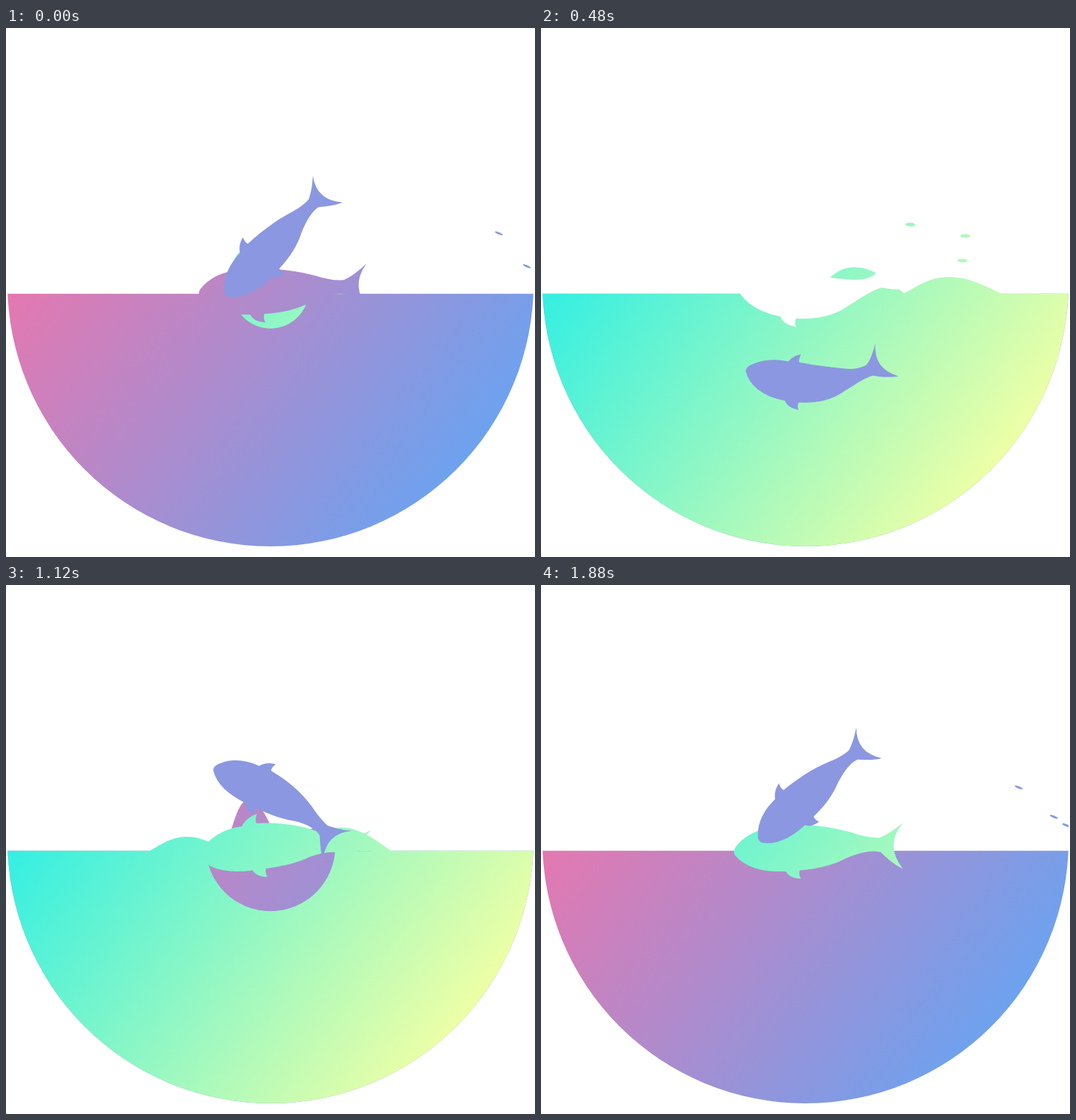
These frames come from a looping animation (748x748 px, 1.92 s). An HTML page with a canvas:

```html
<!DOCTYPE html>
<html lang="en">
<head>
<meta charset="utf-8">
<title>Whale loop</title>
<style>
html, body { margin: 0; width: 100%; height: 100%; overflow: hidden; background: #fff; }
canvas { display: block; }
</style>
</head>
<body>
<canvas id="stage" width="748" height="748"></canvas>
<script>
const ctx = document.getElementById('stage').getContext('2d');
const LOOP = 1920, STEP = 40, WATER = 375.7, DEG = Math.PI / 180;
const mix = (a, b, u) => a + (b - a) * u;

function gradient(from, to) {
  const g = ctx.createLinearGradient(184, 138, 712, 534);
  g.addColorStop(0, from);
  g.addColorStop(1, to);
  return g;
}
const PINK = gradient('#e478b0', '#6da2ef');
const TEAL = gradient('#34efe2', '#eeffa6');
const VIOLET = '#8b97e0';

// Whale outline as quadratic curves (control, end).
// Each point is a distance along the spine and an offset below it.
const PEDUNCLE = [206, -9.5], FIN = [71, 32.5], TAIL = 226, ANCHOR = 88;
const OUTLINE = [
  [[20, 31], [1, 3]], [[-2, -4], [6, -11]], [[28, -32], [66, -31.5]],  // head
  [[74, -43], [88, -45.5]], [[84, -38], [86, -32.5]],                  // back fin
  [[132, -29], [168, -17]], [[190, -9], PEDUNCLE],                     // back
  [[220, -15], [239, -31]], [[213, 1], [240, 34]], [[226, 28], [208, 11]], // tail
  [[192, 6], [158, 19]], [[132, 32], [91, 32.5]],                      // belly
  [[89, 40], [92, 44.5]], [[76, 43], FIN]                              // lower fin
];

function whale(x0, y0, tilt, bend, scale, color) {
  const angle = s => {
    const p = Math.min(s / TAIL, 1);
    return (tilt + bend * ((p + p * p) / 1.9 - 0.12)) * DEG;
  };
  const plot = (s, v) => {
    const n = 12, ds = (s - ANCHOR) / n, a = angle(s);
    let x = -v * Math.sin(a), y = v * Math.cos(a);
    for (let i = 0; i < n; i++) {
      const along = angle(ANCHOR + (i + 0.5) * ds);
      x += ds * Math.cos(along);
      y += ds * Math.sin(along);
    }
    ctx.lineTo(x0 + x * scale, y0 + y * scale);
  };
  ctx.beginPath();
  let from = FIN;
  for (const [control, to] of OUTLINE) {
    for (let u = 0.125; u <= 1; u += 0.125) {
      const at = i => mix(mix(from[i], control[i], u), mix(control[i], to[i], u), u);
      plot(at(0), at(1));
    }
    from = to;
  }
  ctx.fillStyle = color;
  ctx.fill();
}

// Jump key poses: time, height of the anchor, tilt.
const JUMP = [
  [0, 323, -47], [160, 466, -27], [480, 501, 14], [800, 474, 28],
  [1120, 289, 22], [1320, 257, -7], [1600, 262, -25], [1880, 309, -45]
];

// Smooth periodic interpolation of the jump.
function jump(t, c) {
  const n = JUMP.length;
  const key = k => JUMP[(k + n) % n][c];
  const time = k => JUMP[(k + n) % n][0] + Math.floor(k / n) * LOOP;
  const gap = k => time(k + 1) - time(k);
  const rise = k => (key(k + 1) - key(k)) / gap(k);
  const slope = k => (rise(k - 1) * gap(k) + rise(k) * gap(k - 1)) / (gap(k - 1) + gap(k));
  const i = JUMP.filter(k => k[0] <= t).length - 1;
  const u = (t - time(i)) / gap(i), v = 1 - u;
  return key(i) * v * v * (1 + 2 * u) + key(i + 1) * u * u * (1 + 2 * v)
    + gap(i) * u * v * (slope(i) * v - slope(i + 1) * u);
}

// Sea spreading from the centre.
function sea(age, color) {
  const r = Math.min(0.895 * age + 2.05e-6 * age ** 3, 372);
  ctx.save();
  ctx.beginPath();
  ctx.rect(0, WATER, 748, 372);
  ctx.clip();
  ctx.beginPath();
  ctx.arc(374, 372.5 - 0.031 * r, r, 0, 2 * Math.PI);
  ctx.fillStyle = color;
  ctx.fill();
  ctx.restore();
}

// Waves drift between two places (left foot, crest, right foot) and swell once.
const SPLASH = [
  { birth: 100, life: 380, height: 38, pace: 1, from: [134, 134, 134], to: [309, 422, 514] },
  { birth: 0, life: 760, height: 79, pace: 1.3, from: [300, 330, 375], to: [385, 443, 515] },
  { birth: 40, life: 760, height: 42, pace: 0.5, from: [294, 344, 415], to: [512, 577, 652] }
];
const BREACH = [
  { birth: 0, life: 400, height: 27, pace: 1, from: [130, 200, 270], to: [309, 340, 368] },
  { birth: 0, life: 400, height: 45, pace: 1, from: [395, 430, 470], to: [456, 536, 654] }
];

function waves(list, age, color) {
  ctx.fillStyle = color;
  for (const { birth, life, height, pace, from, to } of list) {
    const u = (age - birth) / life;
    if (u <= 0 || u >= 1) continue;
    const [l, p, r] = from.map((x, i) => mix(x, to[i], (age / 540) ** pace));
    const h = height * Math.sin(Math.PI * Math.sqrt(u));
    const top = WATER - h, mid = WATER - 0.6 * h;
    ctx.beginPath();
    ctx.moveTo(l, WATER + 0.5);
    ctx.bezierCurveTo(mix(l, p, 0.4), mid, mix(l, p, 0.6), top, p, top);
    ctx.bezierCurveTo(mix(p, r, 0.35), top, mix(p, r, 0.6), mid, r, WATER + 0.5);
    ctx.fill();
  }
}

// Drops fly with constant acceleration and flatten on the way.
const DROPS = [
  { x: 431, y: 315, vx: 0.208, vy: -0.183, ax: 0.00024, ay: 0.00021 },
  { x: 439, y: 335, vx: 0.57, vy: -0.237, ax: -0.00021, ay: 0.00034 },
  { x: 460, y: 340, vx: 0.425, vy: -0.067, ax: 0, ay: 0.0001 }
];

function drops(age, color) {
  const d = age - 220, k = Math.max(d, 0) / 700;
  if (d < -70 || k > 1.2) return;
  const grow = Math.min(1 + d / 70, 1);
  const rx = (8 - 2 * k) * grow, ry = (1.6 + 3.4 * (1 - k) ** 2) * grow;
  ctx.fillStyle = color;
  for (const { x, y, vx, vy, ax, ay } of DROPS) {
    ctx.beginPath();
    ctx.ellipse(x + vx * d + ax * d * d, y + vy * d + ay * d * d, rx, ry,
      (65 * Math.sqrt(k) - 42) * DEG, 0, 2 * Math.PI);
    ctx.fill();
  }
}

function draw(t) {
  const tealAge = (t + 60) % LOOP, pinkAge = (t - 1020 + LOOP) % LOOP;
  const sway = Math.sin(2 * Math.PI * t / LOOP);
  ctx.clearRect(0, 0, 748, 748);
  ctx.save();
  ctx.beginPath();
  ctx.rect(0, 0, 746, 748);
  ctx.clip();

  sea(LOOP, PINK);
  sea(tealAge, TEAL);
  if (pinkAge < tealAge) sea(pinkAge, PINK);

  waves(SPLASH, tealAge, TEAL);
  waves(SPLASH, pinkAge, PINK);
  waves(BREACH, t - 900, TEAL);

  const floater = t < 320 ? PINK : t < 1080 ? '#fff' : TEAL;
  whale(360.5, 372 + 6 * sway, 17 * sway - 3, -52 * sway, 1, floater);
  whale(364, jump(t, 1), jump(t, 2), -52 * sway, 0.87, VIOLET);

  drops(tealAge, TEAL);
  drops((pinkAge + 25) % LOOP, PINK);
  ctx.restore();
}

const start = performance.now();
function tick() {
  const elapsed = (performance.now() - start) % LOOP;
  draw(Math.floor(elapsed / STEP) * STEP);
  requestAnimationFrame(tick);
}
tick();
</script>
</body>
</html>
```
